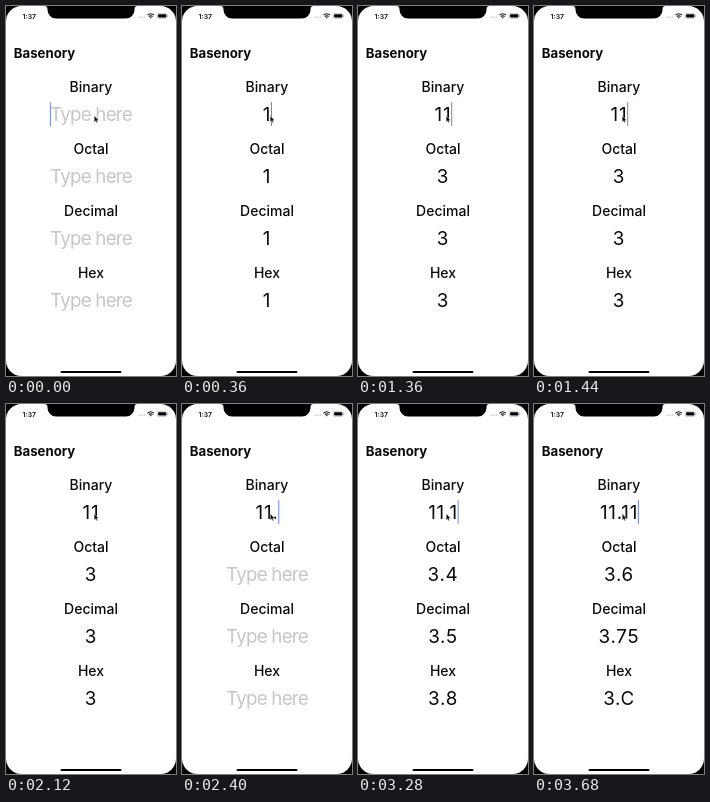
Recreate the animation shown at these times as an HTML page. Size 170 by 370 pixels, loop 3760 ms.

```html
<!DOCTYPE html>
<html lang="en">
<head>
<meta charset="utf-8">
<title>Number base converter</title>
<style>
  html, body { margin: 0; width: 100%; height: 100%; overflow: hidden; background: #000; }
  svg { display: block; width: 100%; height: 100%; }
  text { font-family: Inter, Roboto, sans-serif; fill: #0a0a0a; }
  .title { font-size: 13.2px; font-weight: 700; }
  .label { font-size: 14px; font-weight: 500; text-anchor: middle; }
  .value { font-size: 18.8px; letter-spacing: .75px; text-anchor: middle; }
  .value.empty { fill: #c7c7c9; letter-spacing: -.8px; }
  .clock { font-size: 6.8px; font-weight: 600; }
</style>
</head>
<body>
<svg viewBox="0 0 170 370">
  <rect width="170" height="370" rx="15.5" fill="#fff"/>
  <path d="M38.5 0A3 3 0 0 1 41.5 3V4A8.6 8.6 0 0 0 50.1 12.6H119.9A8.6 8.6 0 0 0 128.5 4V3A3 3 0 0 1 131.5 0Z"/>

  <text class="clock" x="16.6" y="12.7">1:37</text>
  <path d="M132.8 11.2h6.2" stroke="#b5b5b5" stroke-width="1.2" stroke-linecap="round" stroke-dasharray="0 2"/>
  <g fill="none" stroke="#000" stroke-width="1.1">
    <path d="M141.5 9.2Q144.7 6.4 147.9 9.2M142.8 10.6Q144.7 9 146.6 10.6"/>
    <path d="M144.7 12.2l-.7-.8h1.4z" stroke-width=".5" fill="#000"/>
  </g>
  <rect x="151.3" y="7.4" width="9.8" height="5" rx="1.4" fill="none" stroke="#999" stroke-width=".5"/>
  <rect x="152.1" y="8.2" width="8.2" height="3.4" rx=".8"/>
  <path d="M161.8 9.2v1.5" stroke="#999" stroke-width=".6"/>

  <text class="title" x="7.8" y="51.6">Basenory</text>
  <g id="fields"></g>
  <rect id="caret" y="96" width="1" height="24" fill="#7088d8"/>
  <path d="M88.2 109.6V116.2L89.7 114.9L90.7 117.1L91.7 116.6L90.8 114.5H92.7Z"
        stroke="#fff" stroke-width=".5" stroke-linejoin="round"/>
  <rect x="54.5" y="365" width="61" height="2" rx="1"/>
</svg>
<script>
const LOOP = 3760;
const CENTER = 85;
const TYPED = '11.11';
const KEY_TIMES = [360, 1360, 2400, 3280, 3680];
const FRAME = 40;
const CARET_HOLD = 520;
const CARET_FADE = 120;

const fields = document.getElementById('fields');
const caret = document.getElementById('caret');

function addText(className, y, content = '') {
  const node = document.createElementNS('http://www.w3.org/2000/svg', 'text');
  node.setAttribute('class', className);
  node.setAttribute('x', CENTER);
  node.setAttribute('y', y);
  node.textContent = content;
  return fields.appendChild(node);
}

const values = ['Binary', 'Octal', 'Decimal', 'Hex'].map((name, i) => {
  addText('label', 85.6 + 62 * i, name);
  return addText('value', 115 + 62 * i);
});

// Unfinished input such as "11." has no conversion yet.
function convert(binary, base) {
  if (!/\d$/.test(binary)) return '';
  const places = (binary.split('.')[1] || '').length;
  return (parseInt(binary.replace('.', ''), 2) / 2 ** places).toString(base).toUpperCase();
}

function showInput(binary) {
  [binary, ...[8, 10, 16].map(base => convert(binary, base))].forEach((content, i) => {
    values[i].textContent = content || 'Type here';
    values[i].classList.toggle('empty', !content);
  });
  const halfWidth = values[0].getComputedTextLength() / 2;
  caret.setAttribute('x', CENTER + (binary ? halfWidth : -halfWidth) - .2);
}

let shownCount;
function draw(time) {
  const count = KEY_TIMES.filter(key => key <= time).length;
  if (count !== shownCount) {
    shownCount = count;
    showInput(TYPED.slice(0, count));
  }
  const idle = Math.floor((time - (KEY_TIMES[count - 1] || 0)) / FRAME) * FRAME;
  const faded = (idle - CARET_HOLD) / CARET_FADE;
  caret.setAttribute('opacity', Math.min(1, Math.max(0, 1 - faded)));
}

const begin = performance.now();
function tick() {
  draw((performance.now() - begin) % LOOP);
  requestAnimationFrame(tick);
}
tick();
</script>
</body>
</html>
```
